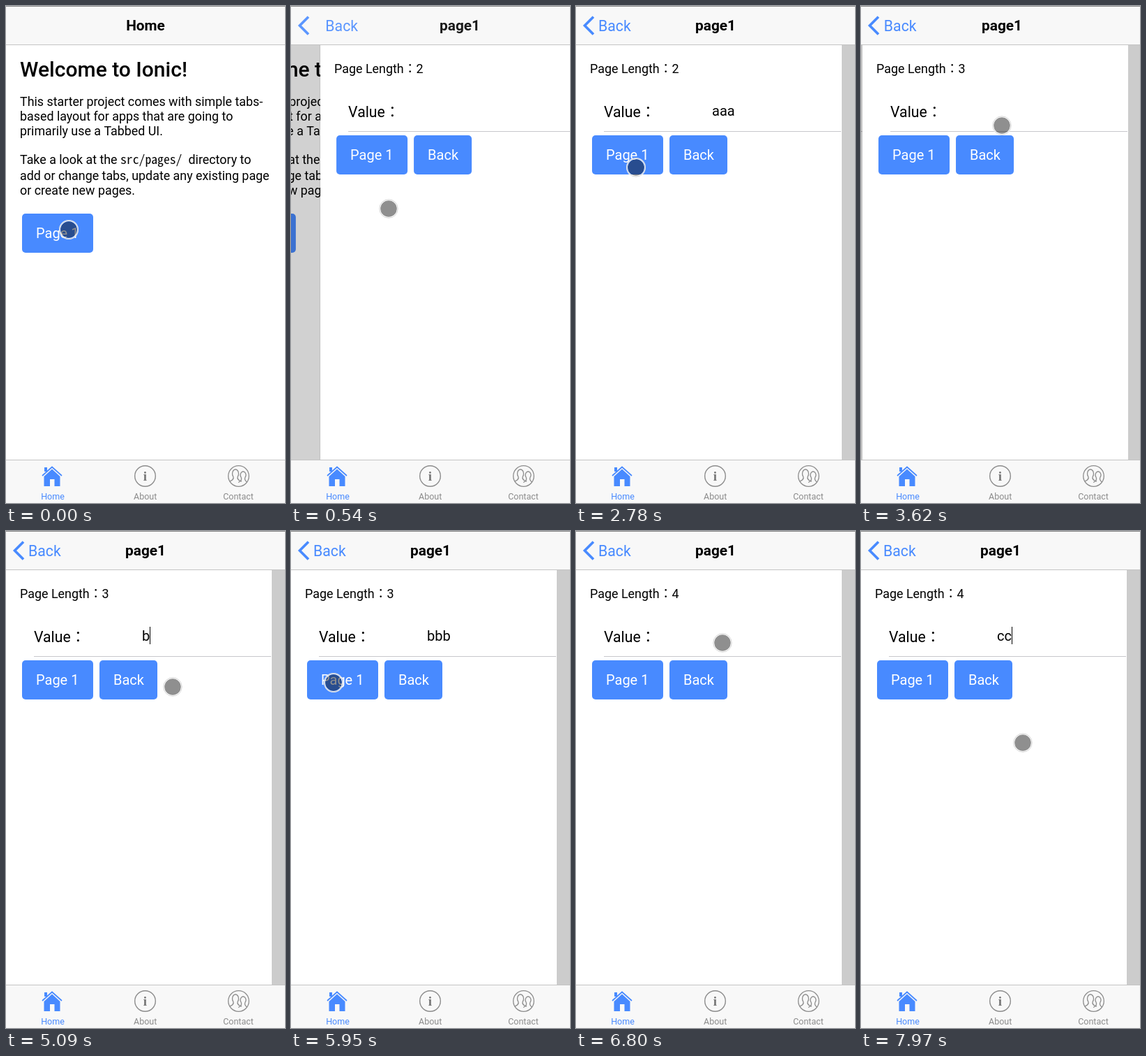
These frames come from a looping animation (400x711 px, 8 s). An HTML page with a canvas:

```html
<!DOCTYPE html>
<html lang="ja">
<head>
<meta charset="utf-8">
<title>Tabs demo</title>
<style>
  html, body { margin: 0; width: 100%; height: 100%; overflow: hidden; background: #fff; }
  canvas { display: block; width: 400px; height: 711px; }
</style>
</head>
<body>
<canvas id="stage"></canvas>
<script>
const W = 400, H = 711, LOOP = 8000, TOP = 56, BOTTOM = 649;
const BLUE = '#488aff', BAR = '#f8f8f8', LINE = '#c4c4c4', GRAY = '#8c8c8c';
const SANS = "Roboto, 'Noto Sans CJK JP', sans-serif";
const MONO = "300 17.7px 'Noto Sans Mono CJK JP', 'Noto Sans Mono', monospace";

const canvas = document.getElementById('stage');
const ratio = window.devicePixelRatio || 1;
canvas.width = Math.round(W * ratio);
canvas.height = Math.round(H * ratio);
const ctx = canvas.getContext('2d');

// Each visit pushes a page, focuses its input, then types one letter per key time.
const visits = [
  { push: 324, focus: 1215, letter: 'a', keys: [1680, 1910, 2220] },
  { push: 3207, focus: 4305, letter: 'b', keys: [4930, 5160, 5400] },
  { push: 6145, focus: 7160, letter: 'c', keys: [7580, 7810] }
];
const PUSH_MS = 500;

// Pointer path: time, x, y
const path = [
  [0, 90, 320], [300, 90, 320], [527, 140, 290], [1070, 195, 159], [1310, 195, 159],
  [1680, 217, 159], [2070, 217, 159], [2290, 233, 190], [2470, 125, 238], [2600, 86, 231],
  [3190, 86, 231], [3615, 202, 171], [3770, 202, 171], [3850, 201, 168], [3940, 201, 168],
  [4090, 207, 163], [4700, 207, 163], [4920, 258, 190], [5085, 238, 224], [5260, 155, 248],
  [5550, 73, 232], [5780, 61, 217], [6080, 61, 217], [6317, 108, 214], [6640, 210, 160],
  [7240, 210, 160], [7580, 252, 235], [7930, 232, 303], [8000, 232, 303]
];

function text(str, x, y, size, color = '#000', weight = 400, align = 'left') {
  ctx.font = `${weight} ${size}px ${SANS}`;
  ctx.fillStyle = color;
  ctx.textAlign = align;
  ctx.fillText(str, x, y);
}

function rect(x, y, w, h, color) {
  ctx.fillStyle = color;
  ctx.fillRect(x, y, w, h);
}

function faded(alpha, draw) {
  if (alpha <= 0) return;
  ctx.save();
  ctx.globalAlpha = Math.min(1, alpha);
  draw();
  ctx.restore();
}

function poly(points, close) {
  ctx.beginPath();
  points.forEach(([x, y]) => ctx.lineTo(x, y));
  if (close) ctx.closePath();
}

function circle(x, y, r) {
  ctx.beginPath();
  ctx.arc(x, y, r, 0, Math.PI * 2);
}

function button(label, x, y, w) {
  ctx.fillStyle = BLUE;
  ctx.beginPath();
  ctx.roundRect(x, y, w, 56, 5);
  ctx.fill();
  text(label, x + 20, y + 35, 20, '#fff');
}

// Cubic bezier (0.36, 0.66, 0.04, 1), solved by bisection
function ease(x) {
  if (x <= 0) return 0;
  if (x >= 1) return 1;
  const curve = (s, a, b) => 3 * (1 - s) ** 2 * s * a + 3 * (1 - s) * s * s * b + s ** 3;
  let lo = 0, hi = 1;
  for (let i = 0; i < 24; i++) {
    const mid = (lo + hi) / 2;
    if (curve(mid, 0.36, 0.04) < x) lo = mid; else hi = mid;
  }
  return curve(lo, 0.66, 1);
}

function homePage() {
  rect(0, TOP, W, BOTTOM - TOP, '#fff');
  text('Welcome to Ionic!', 20, 101, 30, '#000', 500);
  const lines = [
    ['This starter project comes with simple tabs-', 143],
    ['based layout for apps that are going to', 164],
    ['primarily use a Tabbed UI.', 185],
    ['Take a look at the', 226],
    ['add or change tabs, update any existing page', 249],
    ['or create new pages.', 270]
  ];
  lines.forEach(([line, y]) => text(line, 20, y, 17.85));
  text('directory to', 261.5, 226, 17.85);
  ctx.font = MONO;
  ctx.fillText('src/pages/', 164, 226);
  button('Page 1', 23, 297, 102);
}

function valuePage(index, t) {
  const { focus, letter, keys } = visits[index - 1];
  rect(0, TOP, 381, BOTTOM - TOP, '#fff');
  rect(381, TOP, W - 381, BOTTOM - TOP, '#ccc');
  text('Page Length：' + (index + 1), 20, 96, 17.9);
  text('Value：', 40, 159, 21.25);
  rect(40, 179, 340, 1, '#c8c7cc');
  button('Page 1', 23, 185, 102);
  button('Back', 134, 185, 83);

  const typed = keys.filter(k => k <= t);
  const value = letter.repeat(typed.length);
  text(value, 195, 157, 20);
  const since = t - (typed.length ? typed[typed.length - 1] : focus);
  if (since >= 0 && since % 1000 < 500) {
    rect(195 + Math.round(ctx.measureText(value).width), 137, 1, 25, '#000');
  }
}

function page(index, t, dx) {
  ctx.save();
  ctx.translate(dx, 0);
  if (index) valuePage(index, t); else homePage();
  ctx.restore();
}

function chevron() {
  ctx.strokeStyle = BLUE;
  ctx.lineWidth = 3.6;
  poly([[25, 15.5], [12.5, 28], [25, 40.5]]);
  ctx.stroke();
}

function header(index, p) {
  rect(0, 0, W, TOP, BAR);
  rect(0, 0, W, 1, '#8a8a8a');
  rect(0, 55, W, 1, LINE);
  const title = (i, x) => text(i ? 'page1' : 'Home', x, 35, 20.8, '#000', 700, 'center');
  const back = x => text('Back', x, 36, 21.25, BLUE);
  if (p < 1) {
    faded(1 - 1.15 * p, () => title(index - 1, 200 - 132 * p));
    if (index > 1) faded(1 - p, () => back(32));
  }
  faded(p, () => title(index, 200 + W * (1 - p)));
  if (index > 0) {
    faded(index > 1 ? 1 : p, chevron);
    faded(p, () => back(32 + 165 * (1 - p)));
  }
}

function houseIcon() {
  ctx.fillStyle = ctx.strokeStyle = BLUE;
  ctx.lineWidth = 1.7;
  poly([[52, 672], [66, 659.5], [80, 672]]);
  ctx.stroke();
  ctx.fillRect(55, 660, 4, 6);
  poly([[54.5, 673], [66, 662.5], [77.5, 673], [77.5, 687], [69.5, 687],
    [69.5, 677], [63, 677], [63, 687], [54.5, 687]], true);
  ctx.fill();
}

function infoIcon() {
  ctx.strokeStyle = GRAY;
  ctx.lineWidth = 1.4;
  circle(199.5, 672.5, 14.8);
  ctx.stroke();
  ctx.fillStyle = '#777';
  ctx.textAlign = 'center';
  ctx.font = "700 19px 'Liberation Serif', serif";
  ctx.fillText('i', 199.5, 679);
}

function person(x, y, rx, ry, reach) {
  ctx.beginPath();
  ctx.ellipse(x, y, rx, ry, 0, Math.PI * 0.75, Math.PI * 2.25);
  ctx.stroke();
  const neck = y + ry * 0.7;
  for (const side of [-1, 1]) {
    ctx.beginPath();
    ctx.moveTo(x + side * rx * 0.7, neck);
    ctx.quadraticCurveTo(x + side * rx * 0.4, neck + 5, x + side * reach, neck + 7);
    ctx.stroke();
  }
}

function contactIcon() {
  ctx.strokeStyle = GRAY;
  ctx.lineWidth = 1.3;
  circle(333.5, 672.5, 14.8);
  ctx.stroke();
  ctx.save();
  ctx.clip();
  person(329, 669, 4.5, 6, 9);
  person(340, 671, 3.8, 5, 7);
  ctx.restore();
}

function tabBar() {
  rect(0, BOTTOM, W, H - BOTTOM, BAR);
  rect(0, BOTTOM, W, 1, LINE);
  houseIcon();
  infoIcon();
  contactIcon();
  text('Home', 67, 706, 12.5, BLUE, 400, 'center');
  text('About', 199.7, 706, 12.5, GRAY, 400, 'center');
  text('Contact', 333, 706, 12.5, GRAY, 400, 'center');
}

// Hermite interpolation that comes to rest at repeated points
function slope(i, axis) {
  const a = path[i - 1], b = path[i], c = path[i + 1];
  const same = (p, q) => p[1] === q[1] && p[2] === q[2];
  if (!a || !c || same(a, b) || same(b, c)) return 0;
  return (c[axis] - a[axis]) / (c[0] - a[0]);
}

function pointerAt(t) {
  const i = Math.max(0, path.findIndex(p => p[0] > t) - 1);
  const a = path[i], b = path[i + 1], d = b[0] - a[0];
  const s = Math.max(0, (t - a[0]) / d);
  return [1, 2].map(n =>
    a[n] * (1 + 2 * s) * (1 - s) ** 2 + slope(i, n) * d * s * (1 - s) ** 2 +
    b[n] * s * s * (3 - 2 * s) + slope(i + 1, n) * d * s * s * (s - 1));
}

function pointer(t) {
  const [x, y] = pointerAt(t).map(Math.round);
  const ring = (r, width, color) => {
    ctx.strokeStyle = color;
    ctx.lineWidth = width;
    circle(x, y, r);
    ctx.stroke();
  };
  ctx.fillStyle = 'rgba(0,0,0,.44)';
  circle(x, y, 11.8);
  ctx.fill();
  ring(13, 2, 'rgba(255,255,255,.92)');
  ring(13.2, 0.8, 'rgba(0,0,0,.22)');
}

function draw(t) {
  const index = visits.filter(v => v.push <= t).length;
  const p = index ? ease((t - visits[index - 1].push) / PUSH_MS) : 1;
  ctx.setTransform(ratio, 0, 0, ratio, 0, 0);
  rect(0, 0, W, H, '#fff');
  if (p < 1) {
    const edge = W * (1 - p);
    page(index - 1, t, -132 * p);
    rect(0, TOP, W, BOTTOM - TOP, `rgba(0,0,0,${0.2 * p})`);
    rect(edge - 1, TOP, 1, BOTTOM - TOP, 'rgba(0,0,0,.08)');
    page(index, t, edge);
  } else {
    page(index, t, 0);
  }
  header(index, p);
  tabBar();
  pointer(t);
}

const STEP = 77.2, PHASE = 295;
function tick() {
  const now = performance.now() % LOOP;
  draw(PHASE + Math.floor((now - PHASE) / STEP) * STEP);
  requestAnimationFrame(tick);
}
tick();
</script>
</body>
</html>
```
